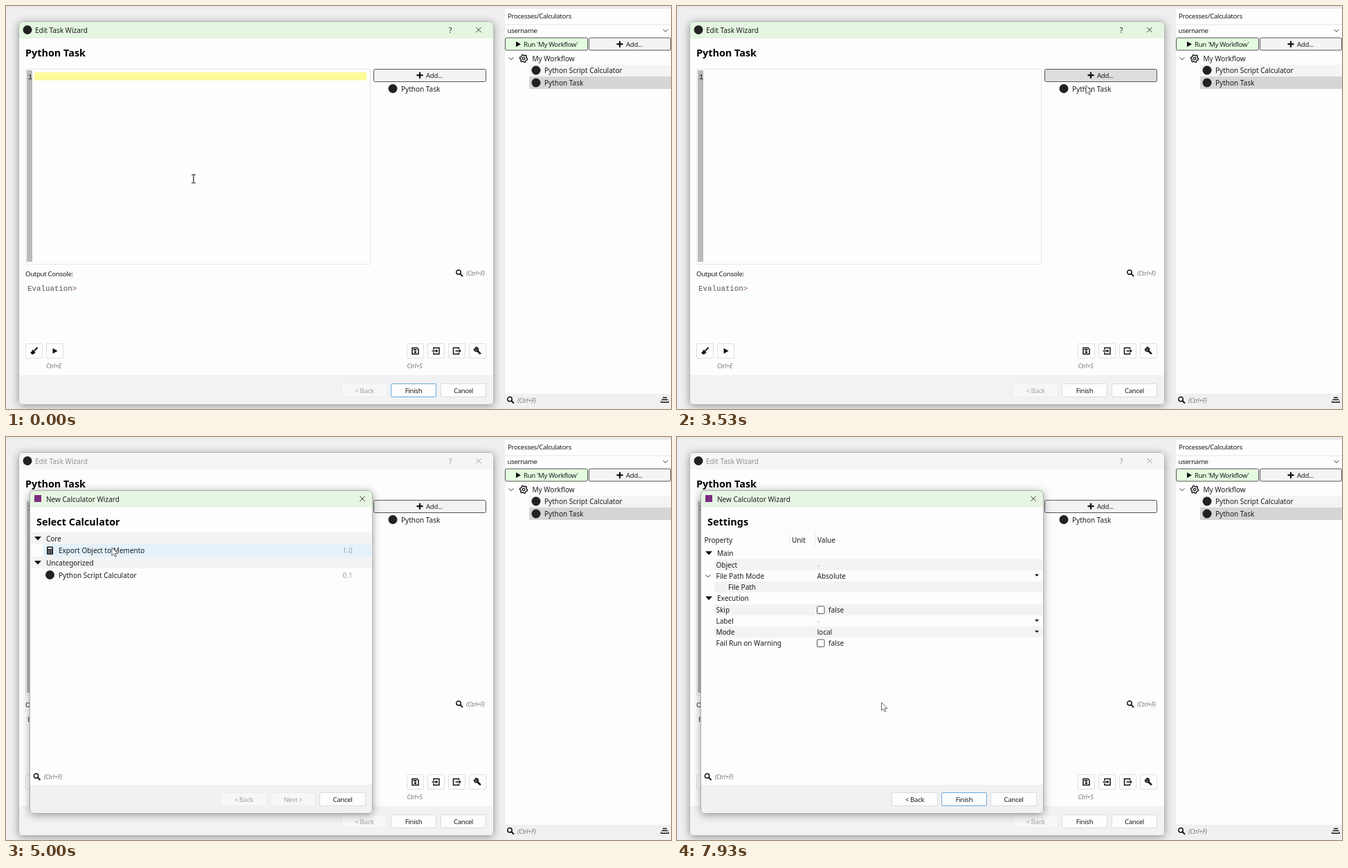
Write an HTML page that moves like this. It is 961 px wide and 583 px high and loops after 8000 ms.

```html
<!DOCTYPE html>
<html lang="en">
<head>
<meta charset="utf-8">
<title>Task Wizard</title>
<style>
  html, body { margin: 0; width: 100%; height: 100%; overflow: hidden; background: #efeef0; }
  svg { display: block; width: 100%; height: 100%; }
  text { font: 10px "Noto Sans", "Open Sans", sans-serif; fill: #1c1c1c; white-space: pre; }
  .ui { font-size: 9.6px; letter-spacing: -.3px; }
  .hint { font-size: 9px; font-style: italic; letter-spacing: -.3px; fill: #777; }
  .head { font-size: 14.4px; font-weight: 700; fill: #000; }
  .mono { font: 10.8px "Liberation Mono", "DejaVu Sans Mono", monospace; fill: #555; }
  .mid { text-anchor: middle; }
  .off { fill: #a2a2a2; }
  .line { fill: none; stroke: #111; stroke-width: 1.5; }
  .thin { fill: none; stroke: #333; stroke-width: 1; }
  .win { filter: drop-shadow(0 2px 6px rgba(0, 0, 0, .36)); }
</style>
</head>
<body>
<svg id="stage" viewBox="0 0 961 583" xmlns="http://www.w3.org/2000/svg"></svg>
<script>
const LOOP = 8000, STEP = 200 / 3;
const CLICK_ADD = 2330, OPEN = 3640, PICK = 5450, NEXT = 7270;

// Markup helpers; text is placed by the vertical centre of its capitals
const rect = (x, y, w, h, fill, extra = '') =>
  `<rect x="${x}" y="${y}" width="${w}" height="${h}" fill="${fill}" ${extra}/>`;
const text = (x, y, s, cls = '', size = 10) =>
  `<text x="${x}" y="${y + size * .36}" class="${cls}">${s}</text>`;
const path = (d, extra = '') => `<path d="${d}" ${extra}/>`;
const at = (x, y, body) => `<g transform="translate(${x} ${y})">${body}</g>`;
const group = (id, body) => `<g id="${id}">${body}</g>`;
const dot = (x, y, r = 6.5) => `<circle cx="${x}" cy="${y}" r="${r}" fill="#222"/>`;
const title = (x, y, s) => text(x, y, s, 'head', 14.4);

const plus = (x, y) => at(x, y, path('M-4.5 0H4.5M0-4.5V4.5', 'stroke="#111" stroke-width="2.2"'));
const play = (x, y) => at(x, y, path('M-3-4L4 0L-3 4Z', 'fill="#111"'));
const fold = (x, y) => at(x, y, path('M-5-2.5H5L0 3Z', 'fill="#111"'));
const drop = (x, y) => at(x, y, path('M-3-1.5H3L0 1.8Z', 'fill="#111"'));
const chevron = (x, y) => at(x, y, path('M-3.5-1.7L0 1.8L3.5-1.7', 'class="thin"'));
const cross = (x, y) => at(x, y, path('M-3.6-3.6L3.6 3.6M3.6-3.6L-3.6 3.6', 'class="thin tint"'));
const search = (x, y) => at(x, y,
  '<circle cx="-1" cy="-1.2" r="3.2" class="line"/>' + path('M1.5 1.3L5 4.8', 'class="line" style="stroke-width:2"'));
const gear = (x, y) => {
  let d = '';
  for (let i = 0; i < 48; i++) {
    const a = i * Math.PI / 24, r = i % 8 < 4 ? 5.6 : 4.2;
    d += `${i ? 'L' : 'M'}${(r * Math.cos(a)).toFixed(2)} ${(r * Math.sin(a)).toFixed(2)}`;
  }
  return at(x, y, path(d + 'Z', 'class="line" style="stroke-width:1.3"') +
    '<circle r="1.7" class="line" style="stroke-width:1.2"/>');
};
const calc = (x, y) => {
  let s = rect(-4.5, -5.5, 9, 11.5, '#111', 'rx="1"') + rect(-3, -4, 6, 2, '#fff');
  for (let i = 0; i < 9; i++) s += rect(-3 + i % 3 * 2.3, -.8 + (i / 3 | 0) * 2.1, 1.3, 1.1, '#fff');
  return at(x, y, s);
};

const button = (x, y, label, id = '', off = false, w = 66) =>
  rect(x + .5, y + .5, w - 1, 19, off ? '#f7f7f8' : '#fdfdfd',
    `rx="1.5" stroke="${off ? '#ececed' : '#dcdcde'}" id="${id}"`) +
  text(x + w / 2, y + 10.3, label, 'ui mid ' + (off ? 'off' : ''));
const strong = (x, y, w, fill, id = '') =>
  rect(x + .5, y + .5, w - 1, 18, fill, `rx="2" stroke="#555" id="${id}"`);
const tool = (x, icon) =>
  rect(x + .5, 488.5, 24, 21, '#fdfdfd', 'rx="1.5" stroke="#e0e0e2"') + at(x + 12.5, 499, icon);

const icons = {
  brush: path('M5-5L.5-.3', 'class="line" style="stroke-width:2"') +
    path('M-1.8-2L2 1.8C1 4-1 5.2-3 5L-5.5 2.2C-4 1.8-2.8 0-1.8-2Z', 'fill="#111"'),
  save: path('M-4.5-4.5H2.5L4.5-2.5V4.5H-4.5Z', 'class="line"') + rect(-2.7, -2.8, 4.6, 2, '#111') +
    '<circle cy="1.7" r="1.6" fill="#111"/>',
  load: path('M-3.5-1.8V-4.5H4.5V4.5H-3.5V1.8M-6 0H1', 'class="line"') + path('M0-2.6L2.8 0L0 2.6Z', 'fill="#111"'),
  send: path('M3-2.5V-4.5H-5V4.5H3V2.5M-2 0H4', 'class="line"') + path('M3.4-2.6L6.4 0L3.4 2.6Z', 'fill="#111"'),
  wrench: path('M-1-1L4.3 4.3', 'class="line" style="stroke-width:2.6"') +
    path('M-4.7-2.8A2.8 2.8 0 1 0-2.6-4.9L-1.7-2.2Z', 'class="line" style="stroke-width:1.8"'),
};

const sidePanel = () =>
  rect(0, 0, 961, 4, '#eaeaeb') +
  rect(721, 4, 240, 579, '#fdfdfe') +
  text(725, 14.6, 'Processes/Calculators', 'ui') +
  rect(721, 26.5, 240, 1, '#e3e3e5') +
  text(724.5, 35.5, 'username', 'ui') + chevron(953, 35.5) +
  strong(721, 45.5, 120, '#e4fbe0') + play(740, 55.3) + text(748, 55.3, "Run 'My Workflow'", 'ui') +
  strong(842, 45.5, 119, '#f4f4f5') + plus(887, 55.2) + text(896, 55.3, 'Add...', 'ui') +
  chevron(730, 76) + gear(748, 76) + text(760.5, 76, 'My Workflow') +
  rect(756, 85, 205, 17, '#f4f4f5') + dot(766, 93) + text(778, 93.6, 'Python Script Calculator') +
  rect(756, 102, 205, 18, '#d5d5d6') + dot(766, 111) + text(778, 111.5, 'Python Task') +
  rect(721, 561, 240, 22, '#f0f0f1') + search(729, 570) + text(739, 570, '(Ctrl+F)', 'hint') +
  at(952, 570, path('M-3-3.5H3M-4.5-.5H4.5M-5.5 3.3H5.5', 'class="line"') +
    path('M-5.5 1.2V4M5.5 1.2V4', 'class="thin"'));

const mainWindow = () =>
  `<g class="win">${rect(18, 22, 687, 555, '#fdfdfe', 'rx="6"')}</g>` +
  path('M18 47V28Q18 22 24 22H699Q705 22 705 28V47Z', 'id="bar"') +
  path('M18 534H705V571Q705 577 699 577H24Q18 577 18 571Z', 'fill="#f2f2f4"') +
  rect(18.5, 22.5, 686, 554, 'none', 'rx="6" stroke="#a9a9ab" stroke-width=".8"') +
  dot(31, 34.5) + group('caption', text(42, 35, 'Edit Task Wizard') + text(640, 35, '?') + cross(683, 34.5)) +
  title(28, 68.3, 'Python Task') +
  rect(28.5, 91.5, 498, 282, '#fefefe', 'stroke="#e5e5e7"') + rect(30, 93, 8, 277, '#bababb') +
  rect(41, 96, 480, 11.5, '#fdfb98', 'id="current"') +
  `<text x="31.8" y="106" class="mono" style="fill:#222">1</text>` +
  strong(531, 91, 163, '#f3f3f5', 'add') + plus(598, 100.2) + text(607, 100.5, 'Add...', 'ui') +
  rect(550, 111, 144, 17.5, '#e4f1fc', 'id="task"') + dot(559, 119.5) + text(571, 120.3, 'Python Task') +
  text(28, 387.3, 'Output Console:', 'ui') + search(655, 386.3) + text(665, 386.5, '(Ctrl+F)', 'hint') +
  `<text x="31" y="412" class="mono">Evaluation<tspan fill="#8a5a4a">&gt;</tspan></text>` +
  tool(28, icons.brush) + tool(58, play(0, 0)) + tool(579, icons.save) +
  tool(609, icons.load) + tool(639, icons.send) + tool(669, icons.wrench) +
  text(58, 520, 'Ctrl+E', 'hint') + text(579.5, 520, 'Ctrl+S', 'hint') +
  button(485, 546, '&lt; Back', '', true) + button(556, 546, 'Finish', 'finish') + button(628, 546, 'Cancel');

const band = (y, h = 17, x = 36) => rect(x, y, 528 - x, h, '#f3f3f4');

const listPage = () =>
  title(44, 123, 'Select Calculator') +
  band(138) + fold(46, 146.5) + text(58, 147, 'Core') +
  rect(54, 155, 474, 18, '#e4f1fb', 'id="export"') + calc(63.5, 164) +
  text(76, 164.5, 'Export Object to Memento') + text(486.5, 164.5, '1.0', 'off') +
  band(173) + fold(46, 181.5) + text(58, 182.3, 'Uncategorized') +
  rect(54, 190, 474, 18, '#e4f1fb', 'id="script"') + dot(63.5, 199.5) +
  text(76, 200, 'Python Script Calculator') + text(486.5, 200, '0.1', 'off') +
  button(310, 514, '&lt; Back', '', true, 67) +
  group('nextOff', button(382, 514, 'Next &gt;', '', true)) +
  group('nextOn', button(382, 514, 'Next &gt;', 'next'));

const check = y => rect(202.5, y - 5, 10.5, 10.5, '#fff', 'rx="1.5" stroke="#555"') + text(219, y + .3, 'false');

const settingsPage = () =>
  title(44, 123, 'Settings') +
  text(39.5, 149, 'Property') + text(166, 149, 'Unit') + text(203, 149, 'Value') +
  rect(162, 138, 1, 21, '#ececee') + rect(199, 138, 1, 21, '#ececee') +
  fold(46, 167.8) + text(58, 168.3, 'Main') +
  [[177, 54], [209, 54], [242, 54], [274, 54]].map(([y, x]) => band(y, 16, x)).join('') +
  text(56.5, 185, 'Object') + text(203, 185, '-', 'off') +
  chevron(45, 201) + text(56.5, 201, 'File Path Mode') + text(202.5, 201, 'Absolute') + drop(520, 200) +
  text(74, 217, 'File Path') +
  fold(46, 233) + text(58, 233.5, 'Execution') +
  text(56.5, 250.5, 'Skip') + check(250) +
  text(56.5, 266.5, 'Label') + text(203, 266.5, '-', 'off') + drop(520, 265.5) +
  text(56.5, 282.5, 'Mode') + text(202.5, 282.5, 'local') + drop(520, 281.5) +
  text(56.5, 298.5, 'Fail Run on Warning') + check(298) +
  button(310, 514, '&lt; Back', '', false, 67) + button(382, 514, 'Finish', 'done');

const dialog = () =>
  `<g class="win">${rect(34, 77, 496, 468, '#fdfdfd', 'rx="6"')}</g>` +
  path('M34 101.5V83Q34 77 40 77H524Q530 77 530 83V101.5Z', 'fill="#e6f6e3"') +
  path('M34 503H530V539Q530 545 524 545H40Q34 545 34 539Z', 'fill="#f1f1f2"') +
  rect(34.5, 77.5, 495, 467, 'none', 'rx="6" stroke="#9c9c9e" stroke-width=".8"') +
  rect(41, 84, 10, 10, '#7b2c80') + text(58, 90, 'New Calculator Wizard') + cross(515, 89.3) +
  search(44.5, 491.5) + text(54.5, 491.7, '(Ctrl+F)', 'hint') +
  button(453, 514, 'Cancel', '', false, 67) +
  group('list', listPage()) + group('settings', settingsPage());

const pointer =
  group('arrow', path('M0 0V11.8L2.8 9.2L4.7 13.3L6.5 12.5L4.7 8.5H8.4Z',
    'fill="#fff" stroke="#555" stroke-width=".9"')) +
  group('beam', path('M-3-6H-.8L0-5.4L.8-6H3M0-5.4V5.4M-3 6H-.8L0 5.4L.8 6H3',
    'fill="none" stroke="#222" stroke-width="1.2"'));

const stage = document.getElementById('stage');
stage.innerHTML = sidePanel() + mainWindow() + group('dialog', dialog()) + group('pointer', pointer);

const el = {};
stage.querySelectorAll('[id]').forEach(n => { if (n.id) el[n.id] = n; });
const set = (id, name, value) => el[id].setAttribute(name, value);
const show = (id, on) => set(id, 'display', on ? 'inline' : 'none');

// Pointer stops: time, x, y
const stops = [
  [0, 271, 250], [330, 271, 250], [1070, 533, 118.5], [1270, 533, 118.5],
  [1800, 594, 103], [2470, 594, 103], [3000, 591, 115], [3560, 591, 115],
  [4130, 507, 131], [4330, 475, 140], [4930, 153, 160], [5670, 153, 160],
  [6730, 412.5, 503], [7000, 412, 521], [7780, 412, 521], [7930, 295.5, 384], [LOOP, 295.5, 384],
];
const ease = p => p * p * (3 - 2 * p);

function pointerAt(t) {
  const i = stops.findIndex(s => s[0] > t);
  const [t0, x0, y0] = stops[i - 1], [t1, x1, y1] = stops[i];
  const p = ease((t - t0) / (t1 - t0));
  return [x0 + (x1 - x0) * p, y0 + (y1 - y0) * p];
}

function draw(t) {
  const [x, y] = pointerAt(t);
  const over = (l, top, r, b) => x >= l && x < r && y >= top && y < b;
  const open = t >= OPEN, picked = t >= PICK, frozen = t >= CLICK_ADD && !open;

  set('pointer', 'transform', `translate(${x} ${y})`);
  const typing = !open && over(38, 92, 526, 373);
  show('beam', typing);
  show('arrow', !typing);

  set('bar', 'fill', open ? '#f5f5f6' : '#e4f5e1');
  set('caption', 'opacity', open ? .45 : 1);
  show('current', t < CLICK_ADD);
  set('finish', 'stroke', t < CLICK_ADD ? '#6aa9dc' : '#dcdcde');
  set('add', 'fill', frozen || !open && over(531, 91, 694, 110) ? '#dededf' : '#f3f3f5');
  show('task', !open && !frozen && over(531, 111, 694, 129));

  show('dialog', open);
  const p = 1 - (1 - Math.min(1, Math.max(0, (t - OPEN + STEP) / 240))) ** 3;
  const k = .9 + .1 * p;
  set('dialog', 'opacity', p);
  set('dialog', 'transform', `translate(282 311) scale(${k}) translate(-282 -311)`);

  show('list', t < NEXT);
  show('settings', t >= NEXT);
  show('export', picked || over(36, 155, 528, 173));
  set('export', 'fill', picked ? '#cce5f9' : '#e4f1fb');
  show('script', over(36, 190, 528, 208));
  show('nextOff', !picked);
  show('nextOn', picked);
  const hot = over(382, 514, 448, 535);
  for (const id of ['next', 'done']) {
    set(id, 'stroke', '#6aa9dc');
    set(id, 'fill', hot ? '#e2f0fb' : '#fdfdfd');
  }
}

function tick(now) {
  const t = now % LOOP;
  draw(Math.min(LOOP - 1, Math.floor((t + 5) / STEP) * STEP));
  requestAnimationFrame(tick);
}
draw(0);
requestAnimationFrame(tick);
</script>
</body>
</html>
```
